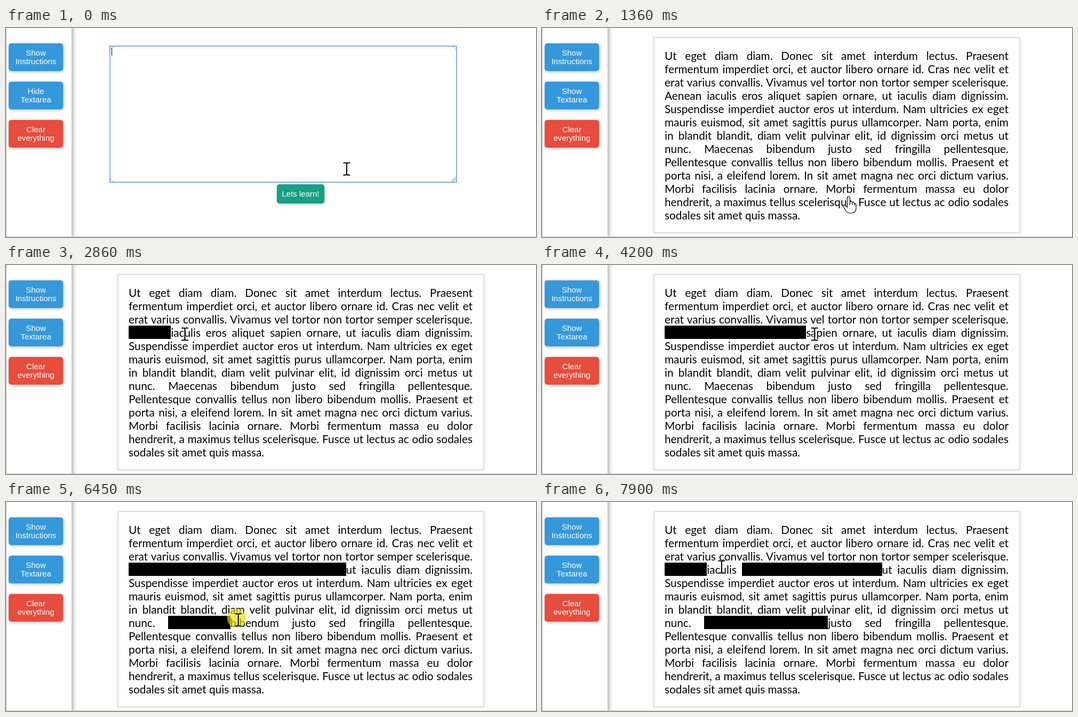
An HTML page that plays this animation: 994x393 px, repeating every 8 s.

```html
<!DOCTYPE html>
<html lang="la">
<head>
<meta charset="utf-8">
<title>Learn by hiding words</title>
<style>
  html, body { margin: 0; width: 100%; height: 100%; overflow: hidden; background: #fff; }
  #stage { position: relative; width: 994px; height: 393px; overflow: hidden; }
  #stage > * { position: absolute; box-sizing: border-box; }
  #side { left: 0; top: -20px; width: 123px; height: 433px; background: #fff;
    border-left: 1px solid #c8c8c8; box-shadow: 0 0 10px rgba(0, 0, 0, .55); }
  #floor { left: 0; top: 392px; width: 994px; height: 1px; background: #c8c8c8; }
  .btn { display: flex; align-items: center; justify-content: center; text-align: center;
    border-radius: 5px; color: #fff; font: 15px/16px "Liberation Sans", Arial, sans-serif;
    box-shadow: 1px 1px 6px rgba(0, 0, 0, .3); }
  .side { left: 5px; width: 102px; height: 52px; background: #3498db; }
  #learn { left: 508px; top: 294px; width: 89px; height: 36px; background: #16a085; }
  #area { left: 195px; top: 34px; width: 650px; height: 256px; border: 1px solid #a9a9a9; border-radius: 10px; }
  #focus { left: 194px; top: 33px; width: 652px; height: 258px; border: 2px solid #86abea; }
  #typed { left: 197px; top: 37px; width: 646px; white-space: pre-wrap;
    font: 13.333px/15px "Liberation Mono", "Courier New", monospace; color: #000; }
  #caret { display: inline-block; width: 1px; height: 15px; margin: 0 -2px 0 1px;
    background: #000; vertical-align: top; }
  #card { left: 209px; top: 17px; width: 688px; height: 369px; background: #fff;
    border: 2px solid #e0e0e0; box-shadow: 0 0 5px rgba(0, 0, 0, .12); }
  #text { left: 230px; top: 39px; width: 645px; color: #000; font: 20.8px/25px Lato, sans-serif;
    font-variant-ligatures: none; }
  #text div { height: 25px; white-space: nowrap; text-align: justify; text-align-last: justify; }
  #text div:last-child { text-align-last: left; }
  #text .off { background: #000; }
  svg { left: 0; top: 0; }
</style>
</head>
<body>
<div id="stage">
  <div id="side"></div>
  <div id="floor"></div>
  <div class="btn side" style="top:29px">Show<br>Instructions</div>
  <div class="btn side" style="top:101px"><span><span id="toggle">Hide</span><br>Textarea</span></div>
  <div class="btn side" style="top:173px;background:#e74c3c">Clear<br>everything</div>
  <div id="area" class="edit"></div>
  <div id="focus" class="edit"></div>
  <div id="typed" class="edit"><span id="paste"></span><span id="caret"></span></div>
  <svg class="edit" width="994" height="393"><path d="M835 288.5l8-8M839.5 288.5l4-4" stroke="#666"/></svg>
  <div id="learn" class="btn edit">Lets learn!</div>
  <div id="card" class="read"></div>
  <div id="text" class="read"></div>
  <svg width="994" height="393">
    <defs><path id="bar" d="M-6.5-11.5h5l1.5 1.5 1.5-1.5h5M-6.5 11.5h5l1.5-1.5 1.5 1.5h5M0-10V10"/></defs>
    <circle id="ring" r="18" fill="#e6e000" fill-opacity=".65"/>
    <g id="beam" fill="none">
      <use href="#bar" stroke="#fff" stroke-width="3.6" stroke-opacity=".75"/>
      <use href="#bar" stroke="#000" stroke-width="2"/>
    </g>
    <path id="hand" fill="#fff" stroke="#000" stroke-width="1.2" stroke-linejoin="round"
      d="M-2.500 19V1.500Q-2.500-1 0-1T2.500 1.500V10Q5 7 7 10Q10 8 11 12Q14 11 14 15V21Q14 30 5 30H2Q-2 30-5 26L-10 18Q-11 14-7 15ZM2.500 10V15M7 10V15M11 12V16"/>
  </svg>
</div>
<script>
const LOOP = 8000, PASTE = 250, SWITCH = 1100, FIRST = 2300, STEP = 575, RING = 150;
const $ = id => document.getElementById(id);
const lines = `Ut eget diam diam. Donec sit amet interdum lectus. Praesent
fermentum imperdiet orci, et auctor libero ornare id. Cras nec velit et
erat varius convallis. Vivamus vel tortor non tortor semper scelerisque.
Aenean iaculis eros aliquet sapien ornare, ut iaculis diam dignissim.
Suspendisse imperdiet auctor eros ut interdum. Nam ultricies ex eget
mauris euismod, sit amet sagittis purus ullamcorper. Nam porta, enim
in blandit blandit, diam velit pulvinar elit, id dignissim orci metus ut
nunc. Maecenas bibendum justo sed fringilla pellentesque.
Pellentesque convallis tellus non libero bibendum mollis. Praesent et
porta nisi, a eleifend lorem. In sit amet magna nec orci dictum varius.
Morbi facilisis lacinia ornare. Morbi fermentum massa eu dolor
hendrerit, a maximus tellus scelerisque. Fusce ut lectus ac odio sodales
sodales sit amet quis massa.`.split('\n');

$('text').innerHTML = lines.map(line =>
  '<div>' + line.split(' ').map(w => `<span>${w} </span>`).join('') + '</div>').join('');

// words are clicked at a steady pace: six on one line, then two further down
const rows = $('text').children;
const words = [...[...rows[3].children].slice(0, 6), ...[...rows[7].children].slice(1, 3)];
const clicks = words.map((el, i) => ({ time: FIRST + i * STEP, el, box: el.getBoundingClientRect() }));
const presses = [940, ...clicks.map(c => c.time)];

// pointer stops: [time, x, y]
const stops = [
  [0, 639, 265], [320, 639, 265], [740, 575, 318], [1420, 575, 318], [1740, 344, 178],
  ...clicks.map(({ time, box }) => [time, box.left + box.width * .4, box.top + 16]),
  [5530, 422, 229], [6450, 437, 222], [6880, 322, 193], [7640, 282, 126], [7880, 337, 122]
].sort((a, b) => a[0] - b[0]);

function pointer(t) {
  const i = stops.findIndex(s => s[0] > t);
  if (i < 0) return stops[stops.length - 1].slice(1);
  const [t0, x0, y0] = stops[i - 1], [t1, x1, y1] = stops[i];
  const k = 1 - (1 - (t - t0) / (t1 - t0)) ** 5;
  return [x0 + (x1 - x0) * k, y0 + (y1 - y0) * k];
}

function show(el, on) { el.style.visibility = on ? 'visible' : 'hidden'; }

function place(id, x, y, on) {
  show($(id), on);
  $(id).setAttribute('transform', `translate(${x.toFixed(1)} ${y.toFixed(1)})`);
}

function render(t) {
  const [x, y] = pointer(t), reading = t >= SWITCH;
  document.querySelectorAll('.edit').forEach(el => show(el, !reading));
  document.querySelectorAll('.read').forEach(el => show(el, reading));
  $('toggle').textContent = reading ? 'Show' : 'Hide';
  $('paste').textContent = t >= PASTE ? lines.join(' ') : '';

  // a clicked word is blacked out unless the pointer is over it
  for (const { time, el, box } of clicks) {
    const over = x >= box.left && x < box.right && y >= box.top && y < box.bottom;
    el.classList.toggle('off', t >= time && !over);
  }

  const hand = y > 294;
  place('hand', x, y, hand);
  place('beam', x, y, !hand);
  place('ring', x - 3, y - 3, presses.some(p => t >= p && t < p + RING));
}

function tick(now) {
  render(now % LOOP);
  requestAnimationFrame(tick);
}
requestAnimationFrame(tick);
</script>
</body>
</html>
```
